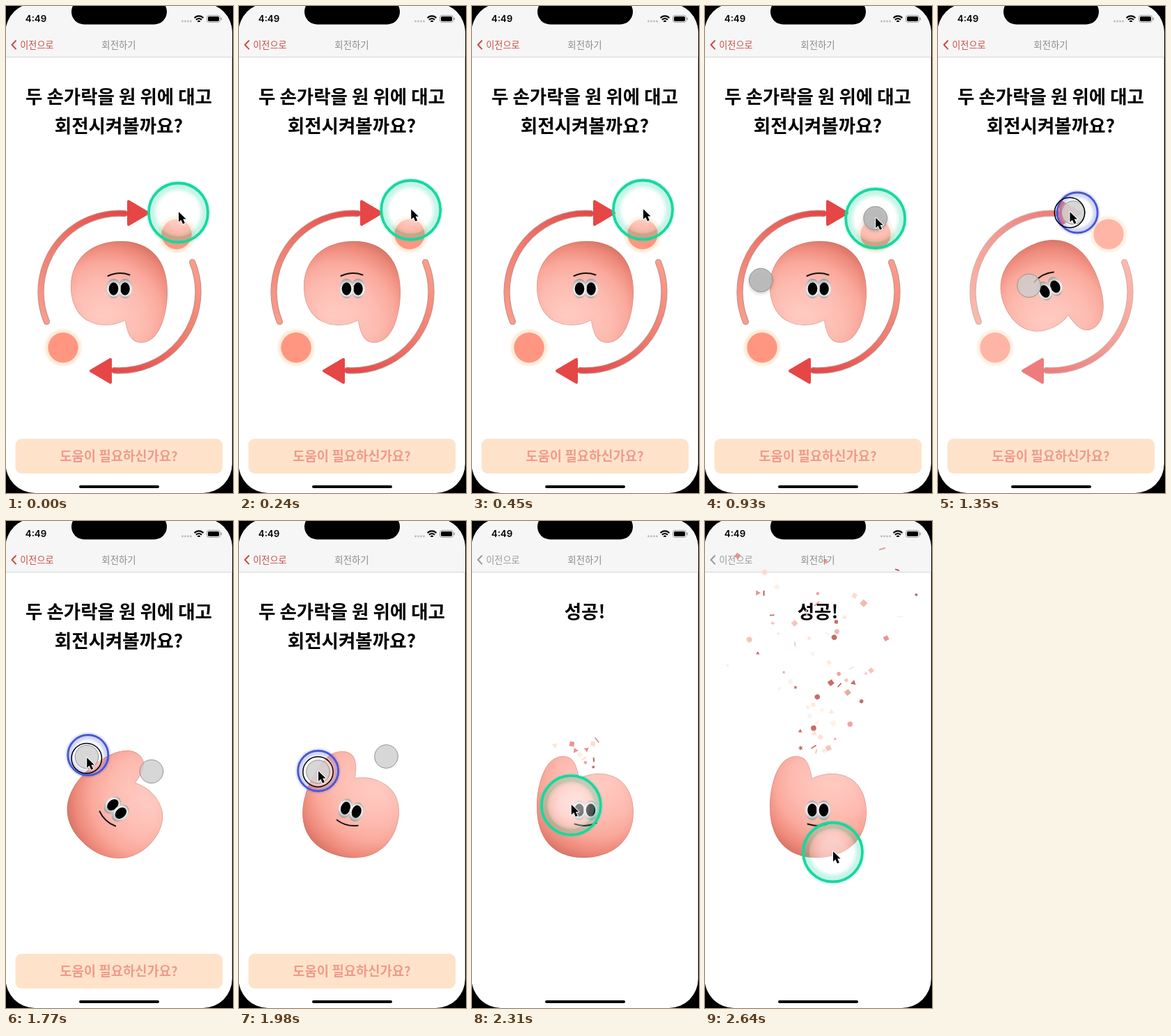
Write an HTML page with a canvas that moves like this. It is 326x700 px and loops after 2.67 s.

```html
<!DOCTYPE html>
<html lang="ko">
<head>
<meta charset="utf-8">
<style>
  html, body { margin: 0; width: 100%; height: 100%; overflow: hidden; background: #000; }
  canvas { display: block; width: 326px; height: 700px; }
</style>
</head>
<body>
<canvas id="stage" width="326" height="700"></canvas>
<script>
const c = document.getElementById('stage').getContext('2d');
const LOOP = 2670, STEP = 30, TAU = Math.PI * 2;
const PRESS = 1110, RELEASE = 2130, BURST = 2250, TOUCH_IN = 750;
const KR = '"Noto Sans CJK KR", "Noto Sans KR", "Noto Sans CJK", sans-serif';
const PIVOT = [162.5, 349.5];

// time, x, y of the pointer
const POINTER = [
  [0, 247.5, 297], [60, 247.5, 297], [300, 246.5, 292], [450, 245.5, 293], [630, 245, 298],
  [930, 244.7, 305.5], [1110, 244.7, 305.5], [1200, 229, 299], [1305, 201, 297],
  [1350, 189, 297], [1440, 157, 302], [1515, 137, 314], [1560, 132, 317],
  [1750, 116, 339], [1950, 113.5, 360.5], [2150, 113.5, 360.5],
  [2300, 140, 405], [2450, 174, 460], [2580, 183.5, 476], [LOOP, 183.5, 476]
];

const clamp = v => Math.max(0, Math.min(1, v));
const ramp = (t, a, b) => { const u = clamp((t - a) / (b - a)); return u * u * (3 - 2 * u); };

function pointerAt(t) {
  t = Math.max(0, t);
  const i = POINTER.findIndex(k => k[0] > t), a = POINTER[i - 1], b = POINTER[i];
  const u = (t - a[0]) / (b[0] - a[0]);
  return [a[1] + (b[1] - a[1]) * u, a[2] + (b[2] - a[2]) * u];
}

function fingerAngle(t) {
  const [x, y] = pointerAt(t);
  const a = Math.atan2(y - PIVOT[1], x - PIVOT[0]);
  return a > 0 ? a - TAU : a;
}

// The body trails the fingers a little, then settles upright.
function bodyTurn(t) {
  const turned = fingerAngle(Math.min(Math.max(t - 50, PRESS), RELEASE)) - fingerAngle(PRESS);
  return turned + (-Math.PI - turned) * ramp(t, RELEASE, 2260);
}

function gradient(g, ...colors) {
  colors.forEach((color, i) => g.addColorStop(i / (colors.length - 1), color));
  return g;
}

function disc(x, y, r, fill, stroke, width = 1) {
  c.beginPath();
  c.arc(x, y, r, 0, TAU);
  if (fill) { c.fillStyle = fill; c.fill(); }
  if (stroke) { c.strokeStyle = stroke; c.lineWidth = width; c.stroke(); }
}

function box(x, y, w, h, r, fill) {
  c.beginPath();
  c.roundRect(x, y, w, h, r);
  c.fillStyle = fill;
  c.fill();
}

function text(str, x, y, font, color, align = 'center') {
  c.font = font;
  c.textAlign = align;
  c.fillStyle = color;
  c.fillText(str, x, y);
}

function faded(alpha, draw) {
  if (alpha <= 0) return;
  c.save();
  c.globalAlpha = alpha;
  draw();
  c.restore();
}

function drawScreen(t) {
  c.fillStyle = '#000';
  c.fillRect(0, 0, 326, 700);
  c.save();
  c.beginPath();
  c.roundRect(-0.5, -4, 325.3, 704, 42);
  c.clip();
  c.fillStyle = '#fff';
  c.fillRect(0, 0, 326, 700);
  c.fillStyle = '#f6f6f6';
  c.fillRect(0, 0, 326, 73);
  c.fillStyle = '#d6d6d6';
  c.fillRect(0, 73, 326, 1);
  c.restore();
  box(94, -10, 137, 36.5, 19, '#000');

  text('4:49', 43, 23, '600 13.3px Inter, sans-serif', '#000');
  for (let i = 0; i < 4; i++) disc(253.5 + i * 4, 22, 1.4, '#bbb');
  c.strokeStyle = '#000';
  c.lineWidth = 2.2;
  for (const r of [1.4, 5, 8.6]) {
    c.beginPath();
    c.arc(277, 23, r, -2.3, -0.84);
    c.stroke();
  }
  c.strokeStyle = '#999';
  c.lineWidth = 1;
  c.beginPath();
  c.roundRect(288.5, 13.5, 19, 10, 3);
  c.stroke();
  box(290, 15, 16, 7, 1.8, '#000');
  box(308.6, 16.5, 1.4, 4, 1, '#999');

  const tint = t < 2160 ? '#c94b43' : '#999';
  c.strokeStyle = tint;
  c.lineWidth = 2;
  c.lineCap = c.lineJoin = 'round';
  c.beginPath();
  c.moveTo(14, 50);
  c.lineTo(8.5, 55.8);
  c.lineTo(14, 61.6);
  c.stroke();
  text('이전으로', 20.3, 60.5, '13.1px ' + KR, tint, 'left');
  text('회전하기', 162, 60.5, '500 13.4px ' + KR, '#8c8c8c');

  const done = ramp(t, 2130, 2300), title = 'bold 26.5px ' + KR;
  faded(1 - done, () => {
    text('두 손가락을 원 위에 대고', 162, 140, title, '#000');
    text('회전시켜볼까요?', 162, 182, title, '#000');
    box(13.5, 622, 297.5, 50, 9, '#fee3ca');
    text('도움이 필요하신가요?', 162, 653.5, 'bold 18.8px ' + KR, '#f19a8b');
  });
  faded(done, () => text('성공!', 162, 140, title, '#000'));
  box(105, 689, 115, 4, 2, '#000');
}

function drawArrow(flip) {
  c.save();
  c.translate(163, 411);
  if (flip) c.rotate(Math.PI);
  const paint = gradient(c.createLinearGradient(-105, 43, 10, -113), '#fc9c8a', '#f27a6d', '#e64545');
  for (const [width, color] of [[9.3, '#b8938d'], [7.2, paint]]) {
    c.strokeStyle = color;
    c.lineWidth = width;
    c.lineCap = 'round';
    c.beginPath();
    c.arc(0, 0, 113, 2.754, 4.78);
    c.stroke();
  }
  c.fillStyle = c.strokeStyle = '#e64646';
  c.lineWidth = 4;
  c.lineJoin = 'round';
  c.beginPath();
  c.moveTo(13, -130);
  c.lineTo(13, -97);
  c.lineTo(41, -113.5);
  c.closePath();
  c.fill();
  c.stroke();
  c.restore();
}

function drawGuides(t) {
  const gone = ramp(t, 1250, 1530);
  if (gone === 1) return;
  drawArrow(false);
  drawArrow(true);
  for (const [x, y] of [[245, 328], [82, 491]]) {
    const glow = c.createRadialGradient(x, y, 21, x, y, 29);
    disc(x, y, 29, gradient(glow, '#fde8d2', '#fdeedd', '#fff8f000'));
    disc(x, y, 21.7, '#ff9681');
  }
  faded(gone, () => box(40, 240, 262, 310, 0, '#fff'));
}

const bodyShape = new Path2D('M131 338C146 338 151 352 154 370C171 361 192 361 207 369' +
  'C224 378 232 398 232 418C232 460 201 484 160 484C116 484 93 455 93 411C93 382 103 338 131 338Z');

function drawBody(t) {
  c.save();
  c.translate(162.5, 411);
  c.rotate(Math.PI + bodyTurn(t));
  c.translate(-162.5, -411);
  c.save();
  c.clip(bodyShape);
  c.fillStyle = gradient(c.createRadialGradient(184, 368, 14, 182, 370, 130),
    '#ffc9c0', '#fec2b8', '#fdb9ae', '#faa99c', '#ee8a7b', '#cc6a5c');
  c.fillRect(90, 335, 145, 152);
  c.shadowColor = 'rgba(190,85,72,.55)';
  c.shadowBlur = 10;
  c.strokeStyle = 'rgba(165,110,102,.4)';
  c.lineWidth = 1.4;
  c.stroke(bodyShape);
  c.restore();

  for (const x of [154, 170.5]) {
    c.beginPath();
    c.ellipse(x, 416, 10.3, 14, 0, 0, TAU);
    c.fillStyle = gradient(c.createRadialGradient(x - 1, 413, 4, x, 416, 14), '#fff', '#e6e6e6', '#989898');
    c.fill();
    c.beginPath();
    c.ellipse(x, 415.5, 6.8, 9.3, 0, 0, TAU);
    c.fillStyle = '#000';
    c.fill();
  }
  c.strokeStyle = '#111';
  c.lineWidth = 2;
  c.lineCap = 'round';
  c.beginPath();
  c.moveTo(147.5, 435.5);
  c.quadraticCurveTo(163, 441, 178.5, 434);
  c.stroke();
  c.restore();
}

function seeded(seed) {
  return () => (seed = (seed * 16807) % 2147483647) / 2147483647;
}

function drawPiece(kind, size) {
  c.beginPath();
  if (kind === 0) c.arc(0, 0, size * 0.5, 0, TAU);
  else if (kind === 1) c.rect(-size / 2, -size / 2, size, size);
  else if (kind === 2) c.rect(-size * 0.65, -0.9, size * 1.3, 1.8);
  else {
    const points = kind === 3 ? 3 : 10;
    for (let i = 0; i < points; i++) {
      const r = size * (points > 3 && i % 2 ? 0.28 : 0.62), a = i / points * TAU;
      c.lineTo(Math.cos(a) * r, Math.sin(a) * r);
    }
  }
  c.fill();
}

// The first pieces fly widest; later ones leave in a narrower, paler stream.
function drawConfetti(t) {
  if (t < BURST) return;
  const rand = seeded(4711), count = 66;
  const colors = ['#b23c3a', '#e58b84', '#f3b1a6', '#fde3cf', '#fdeee2', '#fbd9cb'];
  for (let i = 0; i < count; i++) {
    const age = t - BURST - i * 5.5, early = i < count * 0.3;
    const angle = (rand() - 0.5) * (early ? 1.5 : 1), speed = 0.62 + rand() * 0.28;
    const spin = rand() * 8, kind = Math.floor(rand() * 5), size = 4 + rand() * 4;
    const hue = Math.floor(rand() * colors.length);
    if (age < 0) continue;
    const d = 20 + speed * age;
    c.save();
    c.globalAlpha = early ? 0.9 : 0.75;
    c.translate(163 + Math.sin(angle) * d, 375 - Math.cos(angle) * d);
    c.rotate(spin + age * 0.006);
    c.fillStyle = colors[hue];
    drawPiece(kind, size);
    c.restore();
  }
}

function drawRing(t) {
  const pressed = t >= PRESS && t < RELEASE;
  const shrink = ramp(t, PRESS - 30, PRESS + 90) - ramp(t, RELEASE - 30, RELEASE + 90);
  const [x, y] = pointerAt(t - (pressed ? 42 : 0));
  const r = 42.5 - 13.5 * shrink, rgb = pressed ? '74,88,212' : '23,215,160';
  disc(x, y, r + 2.5, null, `rgba(${rgb},.13)`, 3);
  const core = c.createRadialGradient(x, y, 0, x, y, r * 0.8);
  disc(x, y, r * 0.8, gradient(core, 'rgba(255,255,255,.55)', 'rgba(255,255,255,.5)', 'rgba(255,255,255,.25)'));
  const band = c.createRadialGradient(x, y, r * 0.68, x, y, r);
  disc(x, y, r, gradient(band, `rgba(${rgb},0)`, `rgba(${rgb},.23)`, `rgba(${rgb},.28)`));
  disc(x, y, r, null, `rgb(${rgb})`, pressed ? 3 : 3.8);
}

function drawTouches(t) {
  if (t < TOUCH_IN || t >= RELEASE) return;
  const [x, y] = pointerAt(t - 20), pressed = t >= PRESS;
  const fill = pressed ? 'rgba(205,205,205,.8)' : 'rgba(186,186,186,.92)';
  faded(ramp(t, TOUCH_IN - 30, TOUCH_IN + 60), () => {
    c.shadowColor = pressed ? 'transparent' : 'rgba(0,0,0,.25)';
    c.shadowBlur = 5;
    c.shadowOffsetY = 2;
    disc(x, y, 16.8, fill);
    disc(2 * PIVOT[0] - x, 2 * PIVOT[1] - y, 16.8, fill);
    c.shadowColor = 'transparent';
    disc(x, y, 16.8, null, '#929292');
    disc(2 * PIVOT[0] - x, 2 * PIVOT[1] - y, 16.8, null, '#929292');
  });
}

const arrowCursor = new Path2D('M0 0V14.5L3.4 11.4L6 17.3L8.9 16L6.3 10.3H10.6Z');

function drawPointer(t) {
  const [x, y] = pointerAt(t);
  if (t >= PRESS && t < RELEASE) disc(x, y, 21.7, null, '#000', 1.5);
  c.save();
  c.translate(x + 0.5, y - 1);
  c.strokeStyle = '#fff';
  c.lineWidth = 2;
  c.lineJoin = 'round';
  c.stroke(arrowCursor);
  c.fillStyle = '#000';
  c.fill(arrowCursor);
  c.restore();
}

const layers = [drawScreen, drawGuides, drawBody, drawConfetti, drawRing, drawTouches, drawPointer];
const start = performance.now();

function frame() {
  const t = Math.floor((performance.now() - start) % LOOP / STEP) * STEP;
  for (const draw of layers) draw(t);
  requestAnimationFrame(frame);
}
frame();
</script>
</body>
</html>
```
